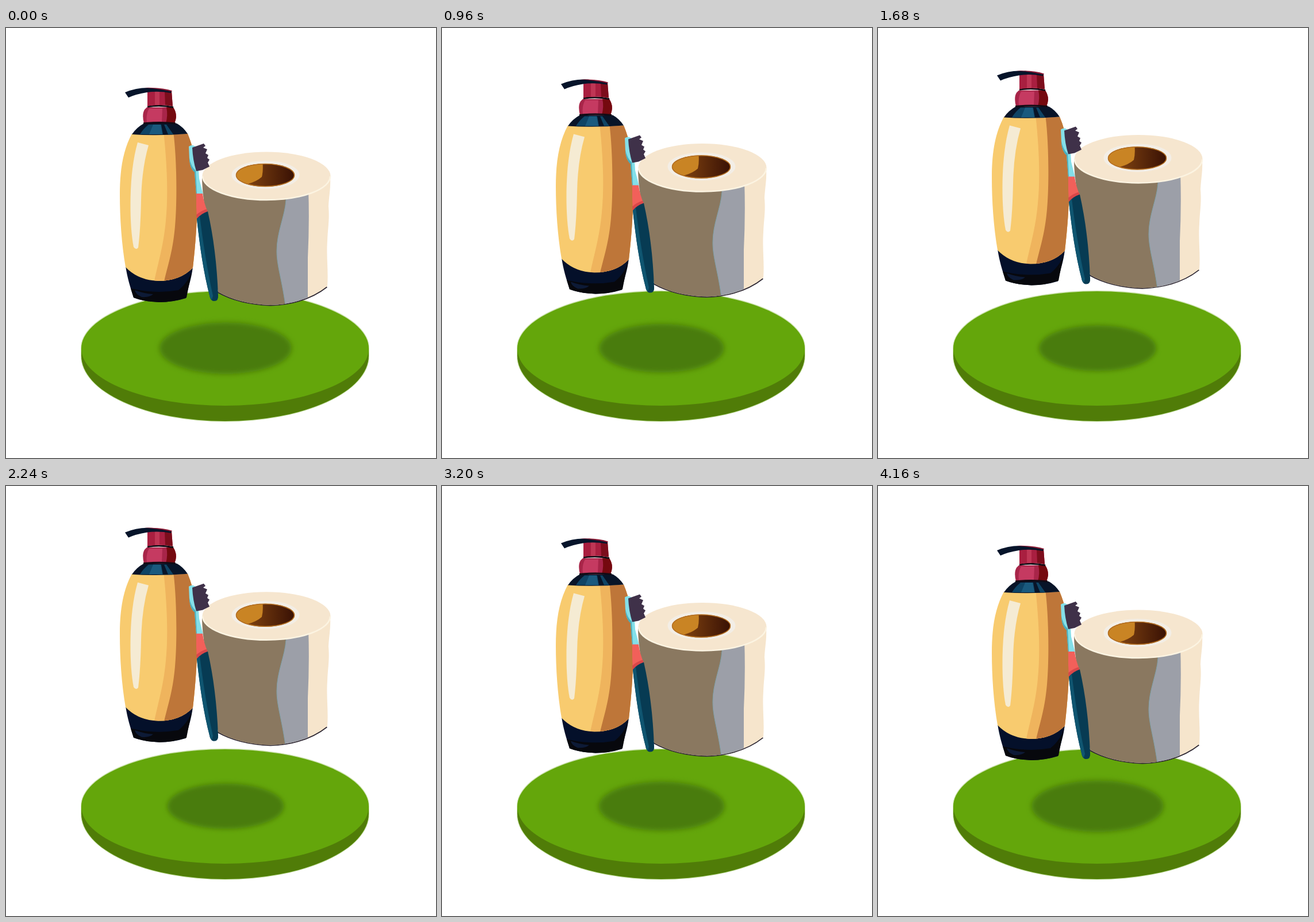
These frames come from a looping animation (748 by 748 pixels, 4.24 s). An HTML page:

```html
<!DOCTYPE html>
<html lang="en">
<head>
<meta charset="utf-8">
<title>Floating toiletries</title>
<style>
  html, body { margin: 0; width: 100%; height: 100%; overflow: hidden; background: #fff; }
  svg { display: block; width: 100vw; height: 100vh; }
</style>
</head>
<body>
<svg viewBox="0 0 748 748">
  <defs>
    <filter id="soft" x="-20%" y="-30%" width="140%" height="160%">
      <feGaussianBlur stdDeviation="5"/>
    </filter>
    <linearGradient id="tube">
      <stop offset="0" stop-color="#834511"/>
      <stop offset="1" stop-color="#360f04"/>
    </linearGradient>
    <clipPath id="bodyClip">
      <path d="M219 184Q267 187 316 184C328 212 333 245 333 285C333 330 330 375 325 417Q303 440 265 440Q230 439 208 416C201 375 198 330 198 290C198 245 204 212 219 184Z"/>
    </clipPath>
    <clipPath id="rollClip">
      <path d="M341 258C341 285 346 312 349 335L360 415L369 459Q405 480 460 482Q520 480 559 449C561 420 557 400 559 370C560 345 563 335 561 310C562 290 565 280 564 258Z"/>
    </clipPath>
    <clipPath id="holeClip"><ellipse cx="451" cy="256" rx="51" ry="20"/></clipPath>
  </defs>

  <g id="platform">
    <path fill="#507c08" d="M131 557V570A250 114 0 0 0 631 570V557Z"/>
    <ellipse cx="381" cy="557.5" rx="250" ry="99.5" fill="#64a60b"/>
    <path fill="none" stroke="#64a60b" stroke-opacity=".3" stroke-width="2" d="M131 557V570A250 114 0 0 0 631 570V557A250 99.5 0 0 0 131 557Z"/>
    <g id="shadow"><ellipse rx="115" ry="45" fill="#4a7c08" filter="url(#soft)"/></g>
  </g>

  <g id="items">
    <g id="roll">
      <path fill="none" stroke="#2a2430" stroke-width="3" d="M368 459Q405 480 460 482Q520 480 558 450"/>
      <g clip-path="url(#rollClip)">
        <path fill="#f6e5cc" d="M335 250H570V490H335Z"/>
        <path fill="#9c9fa8" d="M460 280H526Q528 340 525 400V490H460Z"/>
        <path fill="#8a7860" stroke="#7f9fa6" d="M330 250H487V300C485 328 471 355 471 388C471 415 481 440 487 490H330Z"/>
      </g>
      <ellipse cx="453" cy="257.5" rx="111.5" ry="42" fill="#f6e6cf"/>
      <path fill="none" stroke="#fcf4e2" stroke-width="2.5" d="M342 258A111 41 0 0 0 564 258"/>
      <ellipse cx="451.5" cy="255.5" rx="59" ry="24.5" fill="#f3eee6"/>
      <g clip-path="url(#holeClip)">
        <path fill="url(#tube)" d="M415 230H505V280H415Z"/>
        <path fill="#c98424" d="M395 230H446Q448 248 445 259Q436 267 421 271L416 280H395Z"/>
      </g>
      <ellipse cx="451" cy="256" rx="50.5" ry="19.5" fill="none" stroke="#b36d20" stroke-width="1.5"/>
    </g>

    <g id="bottle">
      <g id="base">
        <path fill="#04102a" d="M208 414Q232 438 265 439Q300 438 325 415C323 435 317 450 313 470Q290 477 267 477Q240 476 222 469C216 450 211 435 208 414Z"/>
        <path fill="#07080d" d="M325 416Q320 440 300 456Q260 463 217 453L222 469Q240 476 267 477Q290 477 314 469Q318 447 325 416Z"/>
        <path fill="#0d1a36" d="M224 456Q240 462 256 463Q250 469 236 468Q225 463 224 456Z"/>
      </g>
      <g clip-path="url(#bodyClip)">
        <path fill="#f8cb6f" d="M190 180H340V445H190Z"/>
        <path fill="#efb45d" d="M274 180C279 225 283 285 278 335C274 380 264 410 257 445H340V180Z"/>
        <path fill="#be7639" d="M291 180C297 225 298 300 294 345C290 390 282 410 274 445H340V180Z"/>
        <path fill="#f5ebd3" d="M229 199L248 204Q236 245 235 300Q234 350 230 382Q226 387 222 381C215 345 215 285 220 245Q223 220 229 199Z"/>
      </g>
      <g id="shoulder">
        <path fill="#081428" d="M240 166H297Q308 172 316 184Q267 188 219 185Q227 173 240 166Z"/>
        <path fill="#0f4465" d="M248 168H279L291 185L233 185Q239 175 248 168Z"/>
        <path fill="#1a5a7e" d="M256 168H269L272 185H249Z"/>
        <path fill="#081428" d="M270 168H275L282 185H273Z"/>
      </g>
      <g id="collar">
        <path fill="#a82549" d="M245 138H291Q298 149 295 160L293 166H240Q236 150 241 142Z"/>
        <path fill="#c53a61" d="M249 140H272L271 165H245Q243 150 249 140Z"/>
        <path fill="#75090f" d="M279 138H291Q298 149 295 160L293 166H278Q282 151 279 138Z"/>
        <path fill="none" stroke="#120a14" stroke-width="3" d="M246 137Q268 133 291 138M239 166Q267 163 295 166"/>
      </g>
      <g id="nozzle">
        <path fill="#a91f40" d="M246 110H288L290 136Q268 132 246 136Z"/>
        <path fill="#bf3655" d="M259 110H267V134H259Z"/>
        <path fill="#7c0d1c" d="M276 110H288L290 136L277 134Z"/>
        <path fill="#06142a" d="M207 112Q226 104 246 104Q270 104 288 110L287 113Q264 109 245 112Q226 115 213 121Z"/>
        <path fill="#8a1a35" d="M240 104Q270 103 289 109L288 110.5Q264 105 240 104Z"/>
      </g>
    </g>

    <g id="brush">
      <path fill="#84dfe8" d="M318 206Q324 202 329 206L335 246L336 262L343 290H331L328 250Q320 244 319 229Z"/>
      <path fill="#4aaebd" d="M319 226Q322 242 330 248L332 288H331L328 251Q320 245 319 226Z"/>
      <path fill="#3f3149" d="M324 208L344 201L347 205L343 208L350 211L347 218L352 221L350 226L354 229L351 234L354 241L342 247L331 249Q325 230 324 208Z"/>
      <path fill="#f2605a" d="M331 288H342Q344 304 351 320Q339 323 332 333L331 311Z"/>
      <path fill="#d94749" d="M331 325Q339 318 349 315L351 320Q339 323 332 333Z"/>
      <path fill="#073b53" d="M332 332Q339 323 351 319C361 363 367 412 369 465Q370 475 362 475Q357 475 355 469C343 423 337 378 332 332Z"/>
      <path fill="#0f5570" d="M332 332L337 327C343 375 350 420 360 466L358 473L355 469C343 423 337 378 332 332Z"/>
    </g>
  </g>
</svg>
<script>
  const LOOP = 4240, STEP = 80, CYCLE = 4080, LIFT = 32;
  const items = document.getElementById('items');
  const shadow = document.getElementById('shadow');

  function draw(now) {
    const t = Math.floor(now % LOOP / STEP) * STEP;
    const phase = Math.min(t / CYCLE, 1);
    const rise = (1 - Math.cos(2 * Math.PI * phase)) / 2;
    items.setAttribute('transform', `translate(0 ${-LIFT * rise})`);
    shadow.setAttribute('transform', `translate(382 557) scale(${1 - 0.12 * rise})`);
  }

  const start = performance.now();
  function frame() {
    draw(performance.now() - start);
    requestAnimationFrame(frame);
  }
  frame();
</script>
</body>
</html>
```
